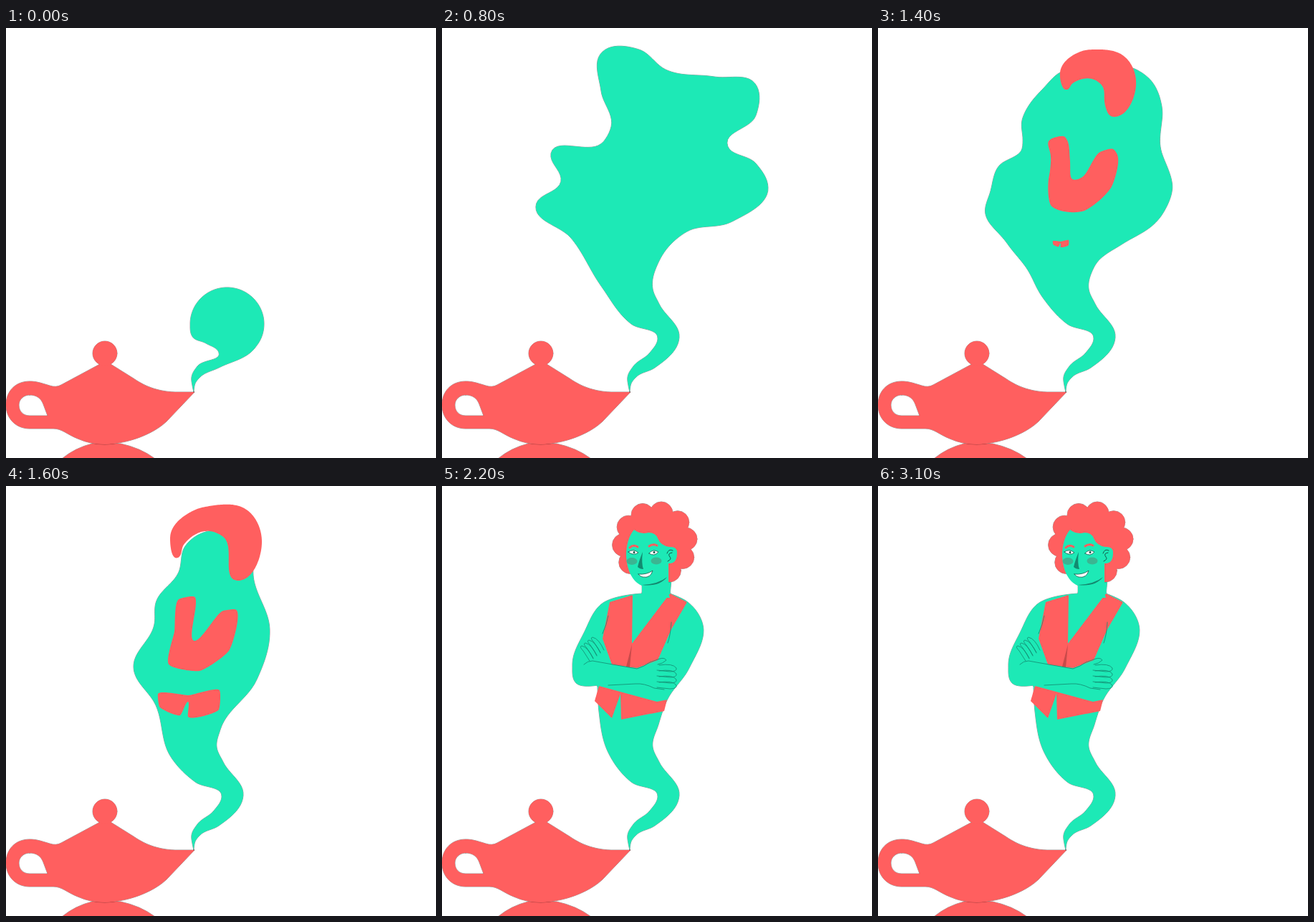
An HTML page with a canvas that plays this animation: 600x600 px, repeating every 3.6 s.

```html
<!DOCTYPE html>
<html>
<head>
<meta charset="utf-8">
<title>Genie</title>
<style>
html, body { margin: 0; width: 100%; height: 100%; overflow: hidden; background: #fff; }
canvas { display: block; }
</style>
</head>
<body>
<canvas id="stage" width="600" height="600"></canvas>
<script>
const ctx = document.getElementById('stage').getContext('2d');
const RED = '#ff5f5f', GREEN = '#1de9b6', INK = '#138a70', DARK = '#14594a';
const LOOP = 3600, STEP = 100, SETTLED = 1800, DETAILED = 1900;
const SUB = 12, COUNT = 240, HEAD = 8 * SUB, FOOT = 6 * SUB;
const range = (n, f) => Array.from({ length: n }, (_, i) => f(i));

// Closed curve through a few key points; roundness 0 gives a polygon
function trace(text, roundness = 1) {
  const v = text.trim().split(/\s+/).map(Number), n = v.length / 2;
  const at = i => { i = (i + n) % n; return [v[2 * i], v[2 * i + 1]]; };
  const tangent = i => {
    const [x0, y0] = at(i - 1), [x, y] = at(i), [x1, y1] = at(i + 1);
    const a = Math.hypot(x - x0, y - y0), b = Math.hypot(x1 - x, y1 - y);
    if (!a || !b) return [0, 0];
    const dx = (x - x0) / a * b + (x1 - x) / b * a, dy = (y - y0) / a * b + (y1 - y) / b * a;
    const l = Math.hypot(dx, dy) || 1;
    return [dx / l, dy / l];
  };
  return range(n, i => {
    const p = at(i), q = at(i + 1), d = tangent(i), e = tangent(i + 1);
    const h = Math.hypot(q[0] - p[0], q[1] - p[1]) * 0.345 * roundness;
    return range(SUB, j => {
      const t = j / SUB, s = 1 - t;
      return [0, 1].map(k => s ** 3 * p[k] + 3 * s * s * t * (p[k] + d[k] * h) +
        3 * s * t * t * (q[k] - e[k] * h) + t ** 3 * q[k]);
    });
  }).flat();
}

// Spreads COUNT points evenly along a line, so that any two shapes can be blended
function spread(line) {
  const sums = [0];
  for (let i = 1; i < line.length; i++)
    sums.push(sums[i - 1] + Math.hypot(line[i][0] - line[i - 1][0], line[i][1] - line[i - 1][1]));
  const total = sums[sums.length - 1];
  let i = 1;
  return range(COUNT, k => {
    const goal = total * k / (COUNT - 1);
    while (i < line.length - 1 && sums[i] < goal) i++;
    return blend(line[i - 1], line[i], (goal - sums[i - 1]) / (sums[i] - sums[i - 1] || 1));
  });
}
const blend = (p, q, k) => [p[0] + (q[0] - p[0]) * k, p[1] + (q[1] - p[1]) * k];
const blob = (text, roundness) => {
  const line = trace(text, roundness);
  return spread([...line, line[0]]);
};
const seed = (x, y) => Array(COUNT).fill([x, y]);

// The tail keeps its own points, so that it stays put while the body changes
function plume(text) {
  const line = trace(text);
  return [...line.slice(0, HEAD), ...spread(line.slice(HEAD, -FOOT)), ...line.slice(-FOOT)];
}
const spout = '262 508 262 508 264 496 271 487 297 474 ';
const tip = ' 267 472 259 487 260 499';
const rise = spout + '331 432 303 385 294 364 ';
const fall = ' 264 413 301 433 290 453' + tip;
const puff = range(13, i => {
  const a = (42 - i * 20.2) * Math.PI / 180;
  return `${308.5 + 51.5 * Math.cos(a)} ${413 + 51 * Math.sin(a)}`;
}).join(' ');

const smoke = [
  [0, plume(spout + puff + ' 279 440 297 453' + tip)],
  [400, plume(spout + '346 426 312 376 292 352 341 251 367 210 356 165 317 148 268 168 243 212 217 300 228 372' + fall)],
  [800, plume(rise + '303 325 340 285 405 270 455 222 438 189 398 163 438 122 438 79 380 68 312 58 ' +
    '275 30 223 34 222 88 236 138 225 159 152 175 166 214 131 247 180 293 222 360' + fall)],
  [1100, plume(rise + '306 322 373 296 473 267 493 230 452 152 489 74 420 23 344 39 309 33 255 17 ' +
    '185 42 176 80 192 122 190 136 125 141 117 193 80 231 125 282 194 315 222 362' + fall)],
  [1600, plume(rise + '299 340 350 270 368 200 346 132 340 90 290 62 250 84 241 120 ' +
    '209 163 207 193 178 254 209 306 230 378' + fall)],
  [SETTLED, plume(rise + '302 333 314 299 345 254 363 190 343 162 318 150 318 150 316 95 287 63 ' +
    '258 90 279 139 279 150 279 150 222 165 199 203 182 250 187 275 217 278 217 278 219 315 232 372' + fall)]
];
const hair = [
  [900, seed(335, 70)],
  [1100, blob('300 44 320 30 340 36 366 72 350 106 326 113 331 94 315 70')],
  [1600, blob('229 72 262 34 284 28 337 34 357 80 322 132 302 70 285 63 248 82 240 100')],
  [SETTLED, blob('238 80 262 34 310 22 345 45 357 80 322 130 312 84 285 65 258 85 250 118')]
];
const vest = [
  [900, seed(294, 215)],
  [1100, blob('233 157 262 146 280 171 297 213 325 168 348 159 340 230 290 257 248 215 249 173')],
  [1600, blob('241 158 262 154 262 216 303 174 320 172 311 230 270 258 227 249 235 203', 0.5)],
  [SETTLED, blob('234 162 266 152 265 220 318 150 342 162 320 200 301 243 272 254 237 249 224 213', 0)]
];
const hem = [
  [1300, seed(255, 300)],
  [1600, blob('212 290 255 292 298 285 297 312 254 322 254 301 243 320 214 308', 0.4)],
  [SETTLED, blob('213 300 219 279 300 301 314 298 310 314 250 326 249 290 237 324', 0)]
];

function morph(keys, t) {
  const next = keys.findIndex(k => k[0] > t);
  let points = keys[keys.length - 1][1];
  if (next > 0) {
    const [ta, a] = keys[next - 1], [tb, b] = keys[next];
    const k = (t - ta) / (tb - ta), eased = ta < 1100 ? k : k * k * (3 - 2 * k);
    points = a.map((p, i) => blend(p, b[i], eased));
  }
  const path = new Path2D();
  points.forEach(p => path.lineTo(...p));
  path.closePath();
  return path;
}

function fill(path, color, rule = 'nonzero') {
  ctx.fillStyle = color;
  ctx.fill(path, rule);
}
function line(path, color, width) {
  ctx.strokeStyle = color;
  ctx.lineWidth = width;
  ctx.stroke(path);
}
function edged(path, color, rule) {
  line(path, 'rgba(0,0,0,.45)', 0.9);
  fill(path, color, rule);
}
const shape = d => new Path2D(d);
function ovals(list) {
  const path = new Path2D();
  for (const [x, y, rx, ry = rx] of list) {
    path.moveTo(x + rx, y);
    path.ellipse(x, y, rx, ry, 0, 0, 7);
  }
  return path;
}

const lamp = shape('M131 469L77 498Q70 502 61 499C48 495 42 493 33 493C13 493 0 507 0 526C0 545 14 559 33 559' +
  'H66C78 559 85 567 100 573Q118 581 138 581C170 580 205 567 224 549L263 508H236C205 507 187 495 178 489L146 469Z' +
  'M33 512C43 512 49 517 52 525L58 541H33C24 541 18 535 18 526C18 518 25 512 33 512Z');
const knob = ovals([[138, 454, 17]]);
const foot = shape('M78 601Q96 586 120 580H160Q188 586 208 601Z');

const curls = ovals([[297, 76, 40, 38], ...range(9, i => {
  const a = (62 - 35 * i) * Math.PI / 180;
  return [297 + 43.5 * Math.cos(a), 80 + 43 * Math.sin(a), 16];
})]);
const face = shape('M257 97C257 82 261 69 268 61Q277 68 288 65Q298 65 301 73Q305 83 317 85' +
  'Q328 84 328 93Q328 109 316 108V150L318 156H279V139C266 134 258 118 257 97Z');

const arms = shape('M232 181Q230 193 224 206M320 190Q319 208 315 219M198 249Q203 244 210 244L272 255' +
  'Q282 252 290 246L304 241Q310 239 313 243Q308 248 301 249M310 284L296 282Q282 275 270 276L232 278');
const fingers = shape(range(4, i => {
  const y = 250 + 8 * i, x = 226 - 5 * i, z = 229 + 4 * i;
  return `M303 ${y}Q322 ${y - 3} 327 ${y + 4}Q328 ${y + 9} 318 ${y + 9}L300 ${y + 7}` +
    `M${x} ${z}Q${x - 7} ${z - 16} ${x - 16} ${z - 18}Q${x - 20} ${z - 17} ${x - 14} ${z - 11}L${x - 5} ${z + 3}`;
}).join(''));

const fold = shape('M265 221L257 252L262 253Z');
const chin = shape('M279 138Q303 141 314 127Q302 137 279 138Z');
const nose = shape('M280 92Q275 104 273 113Q276 116 281 116Q278 108 280 92Z');
const ear = shape('M314 94Q316 87 322 90M321 93Q314 94 318 99Q321 102 315 105');
const brows = shape('M262 86Q267 81 273 85M289 84Q294 80 300 83');
const cheeks = ovals([[265, 105, 7.5, 5], [299, 104.5, 7.5, 5]]);
const eyes = shape('M260 92Q267 87 274 93Q267 98 260 92ZM289 94Q294 87 302 92Q296 99 289 94Z');
const pupils = ovals([[268, 92.5, 1.5], [296, 92.5, 1.5]]);
const smile = shape('M274 123Q286 124 294 118Q291 129 280 127Q276 126 274 123Z');

function drawDetails() {
  fill(fold, '#c94a4a');
  line(arms, INK, 0.8);
  line(fingers, INK, 0.8);
  fill(chin, INK);
  fill(cheeks, '#3bb592');
  fill(nose, INK);
  line(ear, DARK, 1);
  line(brows, RED, 3);
  for (const part of [eyes, smile]) {
    fill(part, '#fff');
    line(part, DARK, 0.8);
  }
  fill(pupils, DARK);
}

function draw(t) {
  ctx.clearRect(0, 0, 600, 600);
  edged(foot, RED);
  edged(knob, RED);
  edged(lamp, RED, 'evenodd');
  fill(knob, RED);
  edged(morph(smoke, t), GREEN);
  for (const part of [vest, hem])
    if (t > part[0][0]) fill(morph(part, t), RED);
  if (t >= SETTLED) {
    edged(curls, RED);
    fill(face, GREEN);
  } else if (t > hair[0][0]) fill(morph(hair, t), RED);
  if (t >= DETAILED) drawDetails();
}

function tick() {
  draw(Math.floor(performance.now() % LOOP / STEP) * STEP);
  requestAnimationFrame(tick);
}
ctx.lineJoin = ctx.lineCap = 'round';
tick();
</script>
</body>
</html>
```
